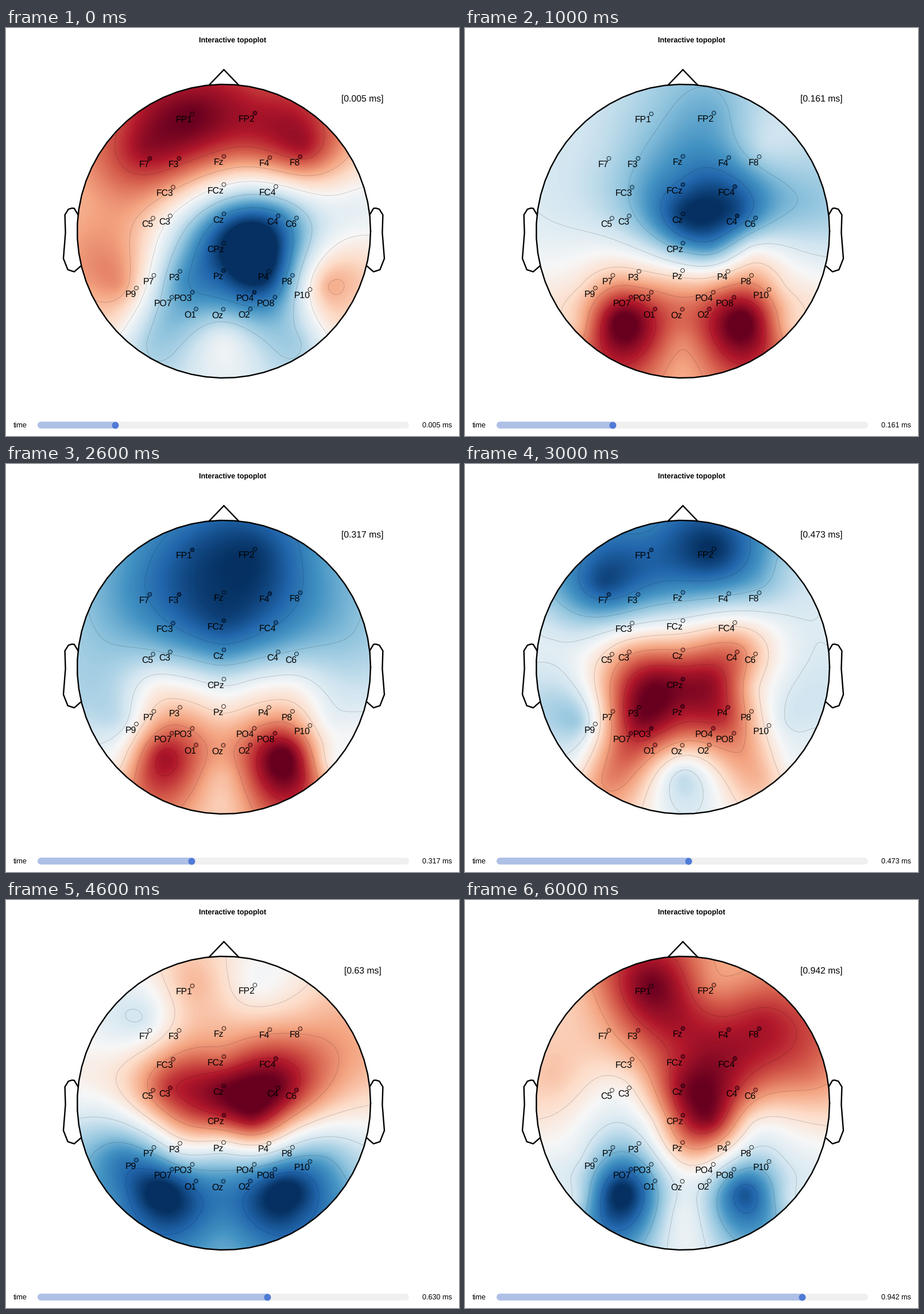
Recreate the animation shown at these times as a matplotlib script. Size 789 by 710 pixels, loop 7000 ms.

```python
import numpy as np
import matplotlib
import matplotlib.pyplot as plt
from matplotlib.animation import FuncAnimation
from matplotlib.patches import Polygon

W, H, DPI = 789, 710, 100
PX = 72 / DPI
CX, CY, R = 379, 353, 255.5

matplotlib.rcParams.update({
    "font.family": "Liberation Sans",
    "text.hinting": "none",
    "lines.dotted_pattern": [1, 2],
})

ELECTRODES = {
    "FP1": (324, 149), "FP2": (433, 147.5),
    "F7": (250, 226.5), "F3": (301, 226.5), "Fz": (379, 223),
    "F4": (459, 225), "F8": (512, 223.5),
    "FC3": (290.5, 276.5), "FCz": (379, 272), "FC4": (469.5, 275.5),
    "C5": (255.5, 330.5), "C3": (285.5, 326.5), "Cz": (379, 323),
    "C4": (473.5, 326.5), "C6": (505.5, 330), "CPz": (379, 374),
    "P7": (257, 430), "P3": (302.5, 423), "Pz": (378.5, 421.5),
    "P4": (457.5, 423), "P8": (498.5, 430),
    "P9": (226.5, 452), "P10": (529, 454.5),
    "PO7": (288.5, 468), "PO3": (324, 459.5),
    "PO4": (432, 459.5), "PO8": (468, 468),
    "O1": (330.5, 488.5), "Oz": (378, 489), "O2": (425, 488.5),
}

# Key places of the scalp, as offsets from its centre
MIDLINE = {"front": -140, "crown": -80, "vertex": -25, "parietal": 75,
           "back": 190}
PAIRS = {
    "pole": (55, -205), "temple": (140, -145), "side": (225, -45),
    "central": (100, -28), "notch": (122, 35), "inner": (50, 30),
    "rear": (75, 90), "mastoid": (180, 95), "occipital": (107, 155),
    "rim": (185, 165),
}


def key_points(state):
    """Positions in head radii and values; a pair is left, right or both."""
    points = []
    for place, value in state.items():
        if place in MIDLINE:
            points.append((0, MIDLINE[place], value))
        else:
            x, y = PAIRS[place]
            left, right = np.broadcast_to(value, 2)
            points += [(-x, y, left), (x, y, right)]
    points = np.array(points, float)
    points[:, :2] /= R
    # Outer places fade slowly towards the edge of the head
    outer = points[np.hypot(points[:, 0], points[:, 1]) > 0.7]
    points = np.vstack([points, outer * (1.25, 1.25, 0.8)])
    return points[:, :2], points[:, 2]


def basis(at, knots):
    d2 = ((at[:, None] - knots[None]) ** 2).sum(-1)
    return np.hstack([d2 * np.log(d2 + 1e-12), np.ones((len(at), 1)), at])


def surface(**state):
    """Thin-plate surface on the grid and at the electrodes, with levels."""
    knots, values = key_points(state)
    n = len(knots)
    system = np.zeros((n + 3, n + 3))
    system[:n] = basis(knots, knots)
    system[n:, :n] = system[:n, n:].T
    weights = np.linalg.solve(system, np.append(values, np.zeros(3)))
    grid = (basis(pixels, knots) @ weights).reshape(len(gy), len(gx))
    inside = grid[np.hypot(*pixels.T).reshape(grid.shape) < 1]
    levels = np.linspace(inside.min(), inside.max(), 8)[1:-1]
    return grid, basis(sites, knots) @ weights, levels


gx = np.linspace(CX - 259, CX + 259, 260)
gy = np.linspace(CY - 259, CY + 259, 260)
mesh = np.meshgrid(gx, gy)
pixels = (np.column_stack([m.ravel() for m in mesh]) - (CX, CY)) / R
sites = (np.array(list(ELECTRODES.values())) - (CX, CY)) / R

steps = [
    surface(front=.65, crown=.02, vertex=-.68, parietal=-.9, back=-.08,
            pole=(.99, .83), temple=(.88, .82), side=(.4, -.08),
            central=(.08, -.65), notch=(.02, -.6), inner=(-.62, -1.3),
            rear=(-.58, -.95), mastoid=(.43, .33), occipital=-.4, rim=.1),
    surface(front=-.6, crown=-.78, vertex=-.97, parietal=.1, back=.5,
            pole=(-.37, -.5), temple=-.25, side=(-.16, -.4),
            central=(-.36, -.85), notch=-.02, inner=(-.25, -.58),
            rear=.38, mastoid=.16, occipital=1.05, rim=.3),
    surface(front=-.98, crown=-.92, vertex=-.6, parietal=.15, back=.32,
            pole=(-.88, -.97), temple=-.7, side=-.39,
            central=-.44, notch=.03, inner=-.05,
            rear=.4, mastoid=(-.2, -.02), occipital=(.82, 1.05), rim=.1),
    surface(front=-.64, crown=-.08, vertex=.5, parietal=.85, back=-.22,
            pole=(-.8, -1), temple=(-.9, -.45), side=-.13,
            central=(.35, .5), notch=(.5, .25), inner=(.97, .88),
            rear=(.95, .72), mastoid=(-.32, -.14), occipital=(.6, .42), rim=0),
    surface(front=.3, crown=.57, vertex=.97, parietal=0, back=-.7,
            pole=(.32, 0), temple=(-.16, .33), side=(.07, .35),
            central=(.7, .97), notch=(.12, .3), inner=(.58, .86),
            rear=-.2, mastoid=(-.68, -.48), occipital=-1.1, rim=-.68),
    surface(front=.86, crown=.84, vertex=.9, parietal=-.12, back=-.57,
            pole=(.99, .63), temple=(.58, .93), side=(.38, .6),
            central=(.45, .82), notch=(0, .15), inner=(.2, .6),
            rear=-.38, mastoid=-.08, occipital=-1.05, rim=-.2),
    surface(front=.83, crown=.8, vertex=.9, parietal=.4, back=-.08,
            pole=(.98, .48), temple=(.4, .8), side=(.28, .52),
            central=(.08, .72), notch=(-.17, .12), inner=(.15, .9),
            rear=(-.4, .05), mastoid=-.15, occipital=(-1.05, -.85), rim=-.22),
]

fig = plt.figure(figsize=(W / DPI, H / DPI), dpi=DPI, facecolor="white")
ax = fig.add_axes([0, 0, 1, 1])
ax.axis("off")


def label(x, y, text, size=12.6, **kw):
    return ax.text(x, y, text, fontsize=size * PX, color="black",
                   va="baseline", zorder=6, **kw)


def stroke(xs, ys, width, color="black", **kw):
    return ax.plot(xs, ys, color=color, lw=width * PX, **kw)[0]


# Head outline, nose and ears
angle = np.linspace(0, 2 * np.pi, 64)
outline = np.column_stack([CX + R * np.cos(angle), CY - R * np.sin(angle)])
clip = ax.add_patch(Polygon(outline, fc="none", ec="none"))
stroke(*outline.T, 2.4, zorder=4)
stroke([354, 379, 404], [98, 72, 98], 2.4, zorder=4, solid_joinstyle="miter")
ear_x = np.array([.497, .510, .518, .5299, .5419, .54, .547, .532, .510, .489])
ear_y = np.array([.0555, .0775, .0783, .0746, .0555, -.0055,
                  -.0932, -.1313, -.1384, -.1199])
for side in (-1, 1):
    stroke(CX + side * 2 * R * ear_x, CY - 2 * R * ear_y, 2.4, zorder=4)

image = ax.imshow(steps[0][0], cmap="RdBu_r", vmin=-1, vmax=1, aspect="auto",
                  extent=(gx[0], gx[-1], gy[-1], gy[0]),
                  interpolation="bilinear", zorder=1)
image.set_clip_path(clip)

dots = ax.scatter(*zip(*ELECTRODES.values()), s=(6.8 * PX) ** 2, c=steps[0][1],
                  cmap="RdBu_r", vmin=-1, vmax=1, edgecolors="black",
                  linewidths=0.8 * PX, zorder=5)
for name, (x, y) in ELECTRODES.items():
    label(x, y + 15, name, 15.8, ha="right")

label(394.5, 25, "Interactive topoplot", weight="bold", ha="center")
clock = label(620.5, 127, "", 15.8, ha="center")

# Slider
label(12.5, 694.5, "time")
readout = label(776.5, 694.5, "", ha="right")
stroke([61, 695.5], [690, 690], 12, "#f0f0f0", solid_capstyle="round", zorder=2)
filled = stroke([61, 190], [690, 690], 12, "#aec0e6",
                solid_capstyle="round", zorder=3)
handle = stroke([190], [690], 0, "#4f7ad6", marker="o", markersize=12 * PX,
                markeredgewidth=0, zorder=4)

# Whole coordinates fall on pixel centres
ax.set_xlim(-0.5, W - 0.5)
ax.set_ylim(H - 0.5, -0.5)
contours = []


def update(i):
    grid, at_sites, levels = steps[i]
    image.set_data(grid)
    dots.set_array(np.clip(1.15 * at_sites, -1, 1))
    while contours:
        contours.pop().remove()
    lines = ax.contour(gx, gy, grid, levels=levels, colors="black", alpha=0.55,
                       linewidths=0.9 * PX, linestyles="dotted", zorder=2)
    lines.set_clip_path(clip)
    contours.append(lines)

    seconds = 0.005 + 0.15616 * i
    clock.set_text(f"[{round(seconds, 3)} ms]")
    readout.set_text(f"{seconds:.3f} ms")
    x = 190 + 66.05 * i
    filled.set_xdata([61, x])
    handle.set_xdata([x])
    return []


anim = FuncAnimation(fig, update, frames=len(steps), init_func=lambda: [],
                     interval=1000, repeat=True, repeat_delay=0, blit=False)
plt.show()
```
